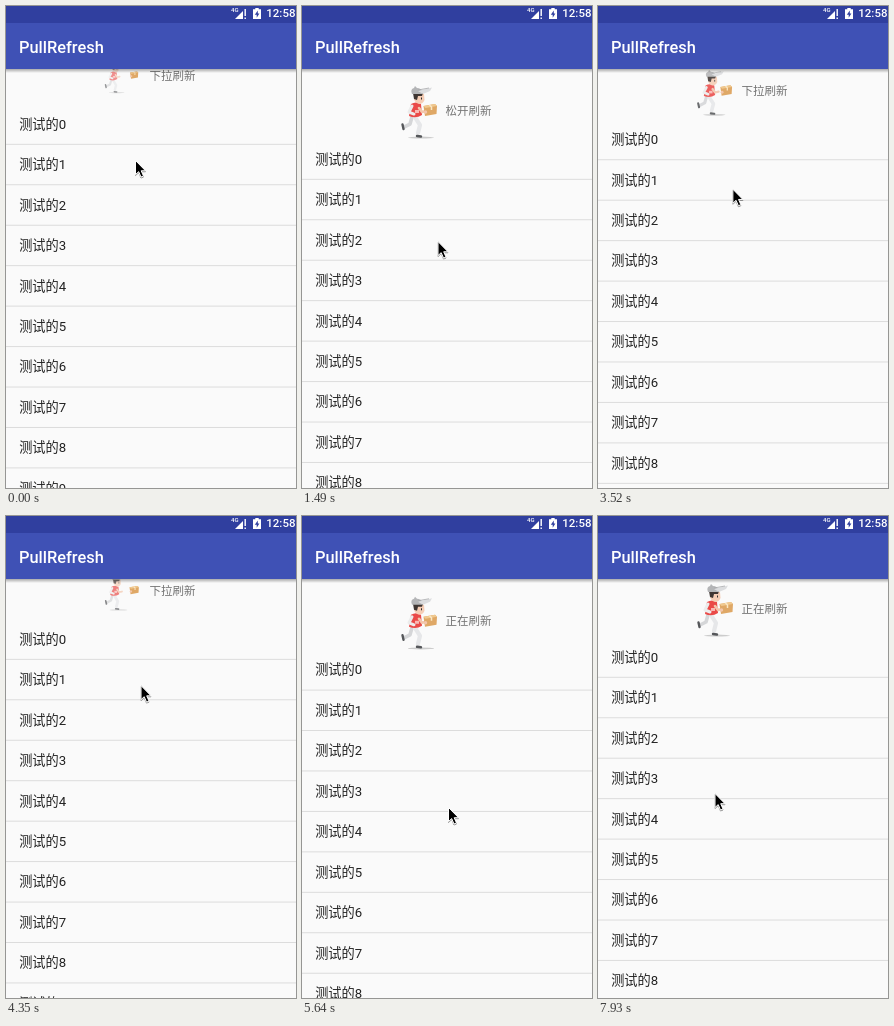
These frames come from a looping animation (290 by 482 pixels, 7990 ms). An HTML page:

```html
<!DOCTYPE html>
<html lang="zh-CN">
<head>
<meta charset="utf-8">
<title>PullRefresh</title>
<style>
html, body { margin: 0; width: 100%; height: 100%; overflow: hidden; background: #fafafa; }
svg { display: block; width: 290px; height: 482px; }
text { font-family: Roboto, "Noto Sans CJK SC", "Noto Sans CJK", sans-serif; }
#rows text { font-size: 13.2px; fill: #212121; }
#rows path { stroke: #dcdcdc; }
#label { font-size: 11.5px; fill: #747474; }
.bar text { font-weight: 500; fill: #fff; }
.limb { fill: none; stroke-linecap: round; stroke-linejoin: round; }
</style>
</head>
<body>
<svg viewBox="0 0 290 482">
  <defs>
    <linearGradient id="shade" x2="0" y2="1">
      <stop stop-color="#000" stop-opacity=".32"/>
      <stop offset="1" stop-color="#000" stop-opacity="0"/>
    </linearGradient>
  </defs>
  <rect width="290" height="482" fill="#fafafa"/>
  <g id="rows"></g>
  <g id="head">
    <g id="man">
      <ellipse cx="21" cy="51.6" rx="13" ry="1" fill="#ccc"/>
      <g id="legs"></g>
      <path d="M11 18 Q16 15 21 18 L22 29 Q16 33 9 30 Z" fill="#ea4a48"/>
      <path class="limb" d="M12 20 L9 26 L14 28" stroke="#ececec" stroke-width="3"/>
      <path class="limb" d="M19 22 L22 26 L26 25" stroke="#f3c6ac" stroke-width="2.6"/>
      <path d="M15 24h4v3h-4z" fill="#f9b7b2"/>
      <path d="M14 8 H24 L24.5 14 Q23 18 19 18 Q15 17 14 13 Z" fill="#f5cdb5"/>
      <path d="M13 7 H23 L22 10 L18 10 L17 14 L14 13 Z" fill="#3e3532"/>
      <path d="M21.5 11.5v2" stroke="#333"/>
      <path d="M12 8 Q10 3 14 2 L15 0 L17 2 Q21 2 23 6 L22 8 Z" fill="#b4b5b7"/>
      <path d="M18 5 L32 1.5 L30 5 L23 8 Z" fill="#dcdddf"/>
      <path d="M18 4 L29 2" stroke="#a8a9ab" stroke-width=".8"/>
    </g>
    <g id="box">
      <path d="M23.5 20 L35 18 L37 20 L36.5 28 L25 30 Z" fill="#dfa866"/>
      <path d="M23.5 20 L35 18 L37 20 L25.5 22 Z" fill="#f0c98f"/>
      <path d="M29.5 19 L31.5 21 V24" fill="none" stroke="#fae7c4" stroke-width="1.5"/>
      <circle cx="25.5" cy="26" r="1.7" fill="#f3c6ac"/>
    </g>
  </g>
  <text id="label" x="143.6"></text>
  <g class="bar">
    <rect y="63" width="290" height="4" fill="url(#shade)"/>
    <rect width="290" height="63" fill="#3f51b5"/>
    <rect width="290" height="17" fill="#303f9f"/>
    <text x="13" y="46.7" font-size="16.4">PullRefresh</text>
    <text x="260.3" y="11.3" font-size="11.5">12:58</text>
    <text x="225" y="6.3" font-size="6">4G</text>
    <path d="M229 13 L237 5 V13 Z" fill="#fff"/>
    <path d="M239.2 3 V10 M239.2 11.4 V13" stroke="#fff" stroke-width="1.4"/>
    <path d="M247 3.2 H249.3 V2 H252.7 V3.2 H255 V13 H247 Z" fill="#fff"/>
    <path d="M251.8 4.5 L248.8 8.8 H250.7 V11.8 L253.4 7.5 H251.8 Z" fill="#303f9f"/>
  </g>
  <path id="cursor" d="M.5 .5 V14.5 L3.7 11.6 L6 17 L8.5 16 L6.2 10.7 H10.5 Z" stroke="#fff" stroke-width="1" style="filter:drop-shadow(.5px 1px .7px #0006)"/>
</svg>
<script>
const $ = id => document.getElementById(id);
const LOOP = 7990, ROW = 40.45, REST = 83, FULL = 58, RELEASE = 5470;

// time, centre of first row, cursor x, cursor y
const keys = [
  [0, 118, 129, 154], [800, 135, 130, 194], [1490, 153, 135.5, 235],
  [2030, 163, 136, 262], [2390, 163, 136, 262], [2860, 146.3, 134.5, 211],
  [3160, 141, 134, 196], [4140, 120.5, 135, 160], [4290, 121, 135, 162],
  [4350, 123, 134.5, 169], [5040, 160.5, 149.5, 255], [RELEASE, 171, 146, 291],
  [5600, 157, 146, 291], [5740, 146, 146, 291], [5880, 141, 146, 291],
  [6440, 141, 141.5, 270], [6740, 141, 134, 271], [7500, 141, 92, 271],
  [7620, 141, 87, 272], [7930, 141, 116.5, 277], [LOOP, 141, 117, 277]
];

const limb = (d, color, w) =>
  `<path class="limb" d="${d}" stroke="${color}" stroke-width="${w}"/>`;
const legs = (back, backShoe, front, frontShoe) =>
  limb(back, "#d5d6d8", 3.6) + limb(backShoe, "#55575a", 2.4) +
  limb(front, "#e6e7e9", 4.2) + limb(frontShoe, "#55575a", 2.4);
const poses = [
  legs("M12 31 L13 40 L8 45", "M7 45 L6 48", "M17 31 L20 39 L17 47", "M17 50 L21 50.5"),
  legs("M12 31 L11 40 L6 47", "M5 49 L8 51.5", "M17 31 L20 38 L16 44", "M15 46 L18 47.5"),
  legs("M12 31 L10 38 L4 41", "M2.5 38.5 L3.5 43", "M15 31 L20 39 L18 47", "M17 50 L21 50.5")
];

for (let i = 0; i < 10; i++) {
  const y = i * ROW;
  $("rows").innerHTML += `<text x="13.2" y="${y + 4.7}">测试的${i}</text><path d="M0 ${y + 20.3}H290"/>`;
}

function sample(t) {
  const i = Math.max(1, keys.findIndex(k => k[0] > t));
  const a = keys[i - 1], b = keys[i], p = (t - a[0]) / (b[0] - a[0]);
  return a.map((v, j) => v + (b[j] - v) * p);
}

const scaleAt = (x, y, s) => `translate(${x} ${y}) scale(${s}) translate(${-x} ${-y})`;
let shownPose = -1;

function draw(now) {
  const t = now % LOOP;
  const [, y, cx, cy] = sample(t);
  const s = Math.min(1, (y - REST) / FULL);
  const running = t >= RELEASE;
  const pose = running ? Math.floor((t - RELEASE) / 70) % 3 : 2;

  $("rows").setAttribute("transform", `translate(0 ${y})`);
  $("head").setAttribute("transform", `translate(98 ${y - 73})`);
  $("man").setAttribute("transform", scaleAt(0, 26.5, s));
  $("man").setAttribute("opacity", s);
  $("box").setAttribute("transform", scaleAt(30, 24, s));
  $("label").setAttribute("y", y - 44.4);
  $("label").textContent = running ? "正在刷新" : s < 1 ? "下拉刷新" : "松开刷新";
  $("cursor").setAttribute("transform", `translate(${cx} ${cy})`);
  if (pose !== shownPose) $("legs").innerHTML = poses[shownPose = pose];
  requestAnimationFrame(draw);
}
draw(0);
</script>
</body>
</html>
```
